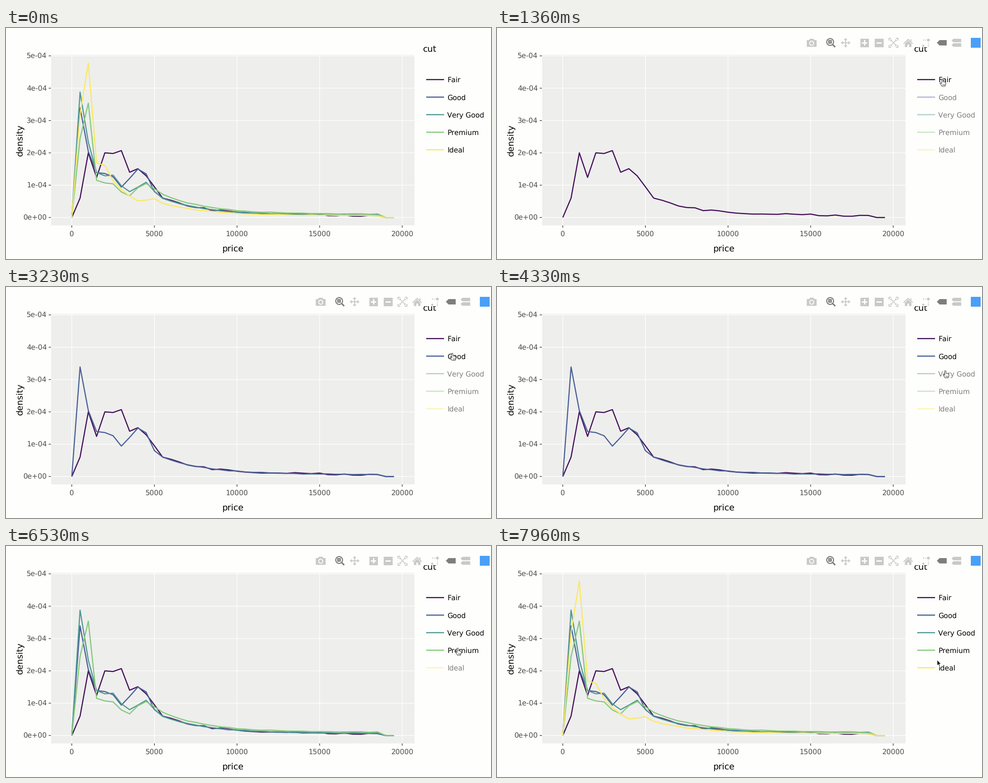
These frames come from a looping animation (1085x516 px, 8 s). A matplotlib script:

```python
import numpy as np
import matplotlib.pyplot as plt
from matplotlib.animation import FuncAnimation
from matplotlib.collections import LineCollection
from matplotlib.patches import Circle, Polygon, Rectangle
from matplotlib.transforms import Affine2D

W, H, DPI = 1085, 516, 100
LOOP, STEP = 8000, 20
PT = 72 / DPI  # points per pixel

BG, PANEL = "#fefefc", "#eeeeed"
LIGHT, DARK, BLUE = "#c9c9c9", "#7e7e7e", "#4a9ff8"

plt.rcParams.update({
    "font.family": "DejaVu Sans",
    "text.hinting": "none",
    "text.kerning_factor": 6,
    "toolbar": "None",
})

fig = plt.figure(figsize=(W / DPI, H / DPI), dpi=DPI, facecolor=BG)
ax = fig.add_axes([0, 0, 1, 1])
ax.set_xlim(0, W)
ax.set_ylim(H, 0)
ax.axis("off")


# ---------- plot scales ----------

def px(price):
    return 147.2 + price * 184.8 / 5000


def py(micro):
    """Pixel row of a density given in millionths."""
    return 423.3 - 0.722 * micro


def label(x, y, text, size=15.7, color="#4d4d4d", **kw):
    return ax.text(x, y, text, fontsize=size * PT, color=color,
                   va="baseline", **kw)


def segments(segs, color, width):
    ax.add_collection(LineCollection(segs, colors=color, zorder=1, snap=False,
                                     linewidths=width * PT))


def stroke(x, y, color):
    line, = ax.plot(x, y, color=color, lw=2.5 * PT, snap=False, zorder=3,
                    solid_joinstyle="round", solid_capstyle="butt")
    return line


# ---------- panel, grid, axes ----------

ax.add_patch(Rectangle((101, 60), 813, 381, fc=PANEL, lw=0, zorder=0))
xs = [px(5000 * i) for i in range(5)]
ys = [py(100 * i) for i in range(6)]
segments([[(x, 60), (x, 441)] for x in xs]
         + [[(101, y), (914, y)] for y in ys], "#fefefe", 1.5)
segments([[(x, 441), (x, 446)] for x in xs]
         + [[(95.5, y), (100.5, y)] for y in ys], "#444444", 1.5)

for i, x in enumerate(xs):
    label(x, 466, str(5000 * i), ha="center")
for i, y in enumerate(ys):
    label(91.6, y + 5.9, f"{i}e-04" if i else "0e+00", ha="right")

label(507.5, 499, "price", 19.4, "black", ha="center")
label(933, 53, "cut", 19.4, "black")
label(37.3, 250, "density", 19.4, "black", rotation=90,
      rotation_mode="anchor", ha="center")


# ---------- series and legend ----------

POINTS, TAIL = 40, 11
rng = np.random.default_rng(7)
series = []


def density(head, start, floor, jitter):
    """Key points for the peaks, then a noisy decay that ends at zero."""
    i = np.arange(POINTS - TAIL)
    tail = floor + (start - floor) * np.exp(-i / 5.5)
    tail += jitter * rng.uniform(-1, 1, i.size) * (i > 0)
    tail[-2:] = 0
    return np.concatenate([[0], head, tail])


def add_series(name, color, show_at, head, start, floor, jitter=1):
    line = stroke(px(500 * np.arange(POINTS)),
                  py(density(head, start, floor, jitter)), color)
    y = 115.2 + 39.2 * len(series)
    key = stroke([940, 980], [y, y], color)
    text = label(987, y + 6, name, color="black")
    series.append((show_at, y, line, key, text))


add_series("Fair", "#440e58", 0,
           [60, 200, 124, 200, 198, 207, 140, 151, 129, 95], 60, 6, 3)
add_series("Good", "#486097", 3230,
           [339, 204, 139, 136, 126, 94, 121, 150, 135, 80], 60, 6)
add_series("Very Good", "#4f9794", 5000,
           [388, 233, 139, 129, 131, 98, 80, 94, 109, 81], 59, 7)
add_series("Premium", "#84c97b", 6530,
           [244, 354, 115, 107, 104, 79, 67, 92, 105, 89], 72, 10)
add_series("Ideal", "#fae962", 7830,
           [320, 478, 169, 161, 114, 87, 66, 51, 54, 58], 44, 5.5)

ISOLATE = 1260


# ---------- toolbar ----------

bar = []


def put(patch):
    patch.set_zorder(5)
    bar.append(ax.add_patch(patch))


def box(x, y, w, h, color=LIGHT):
    put(Rectangle((x, y), w, h, fc=color, lw=0))


def poly(points, color=LIGHT):
    put(Polygon(points, closed=True, fc=color, lw=0))


def disc(x, y, r, color=LIGHT):
    put(Circle((x, y), r, fc=color, lw=0))


def tag(x, y, w, h, color=LIGHT):
    """Label shape pointing left, centred on row y."""
    tip = h / 2
    poly([(x, y), (x + tip, y - tip), (x + w, y - tip),
          (x + w, y + tip), (x + tip, y + tip)], color)


def camera(x, y):
    box(x - 11, y - 6.5, 22, 15.5)
    poly([(x - 6, y - 6), (x - 4, y - 9), (x + 4, y - 9), (x + 6, y - 6)])
    disc(x, y + 1, 5.6, BG)
    disc(x, y + 1, 3.6)


def magnifier(x, y):
    poly([(x + 4, y + 6), (x + 6, y + 4), (x + 12.5, y + 10),
          (x + 10, y + 12.5)], DARK)
    disc(x, y, 8.8, DARK)
    disc(x, y, 6.4, BG)
    box(x - 4, y - 4, 8, 8, DARK)
    box(x - 2, y - 2, 4, 4, "#a9a9a9")


def cross_arrows(x, y):
    box(x - 1.2, y - 7, 2.4, 14)
    box(x - 7, y - 1.2, 14, 2.4)
    for dx, dy in [(1, 0), (-1, 0), (0, 1), (0, -1)]:
        cx, cy = x + 6 * dx, y + 6 * dy
        poly([(cx + 4.8 * dx, cy + 4.8 * dy),
              (cx + 4 * dy, cy + 4 * dx), (cx - 4 * dy, cy - 4 * dx)])


def square_sign(x, y, plus):
    box(x - 9.7, y - 9.5, 19.5, 19)
    box(x - 6, y - 1.5, 12, 3, BG)
    if plus:
        box(x - 1.5, y - 6, 3, 12, BG)


def expand(x, y):
    bracket = np.array([(10.8, 10.8), (10.8, 5), (9.2, 5),
                        (9.2, 9.2), (5, 9.2), (5, 10.8)])
    spoke = np.array([(7.2, 7.2), (7.2, 3), (5.7, 4.5), (1, -0.2),
                      (-0.2, 1), (4.5, 5.7), (3, 7.2)])
    for flip in [(1, 1), (1, -1), (-1, 1), (-1, -1)]:
        for shape in (bracket, spoke):
            poly(shape * flip + (x, y))


def house(x, y):
    poly([(x - 11, y + 1.5), (x, y - 9), (x + 11, y + 1.5),
          (x + 9.4, y + 2.8), (x, y - 6), (x - 9.4, y + 2.8)])
    poly([(x - 7.3, y + 2.3), (x, y - 4.7), (x + 7.3, y + 2.3),
          (x + 7.3, y + 9.5), (x - 7.3, y + 9.5)])
    box(x + 5, y - 8.2, 2.6, 5)
    box(x - 2, y + 3.8, 4, 5.8, BG)


def spikes(x, y):
    disc(x, y, 3.2)
    for d in (9.9, 5, ):
        box(x - d - 2.4, y - 1.4, 2.8, 2.8)
    for d in (5.5, 9.5, 13):
        box(x - 1.4, y + d, 2.8, 2.2)
    disc(x - 11.5, y + 12.5, 2.4)


box(688, 12, 397, 30.5, BG)
camera(704, 33)
magnifier(745.3, 31.3)
cross_arrows(779.9, 33)
square_sign(822.2, 33, True)
square_sign(854.8, 33, False)
expand(887, 33)
house(919.8, 33)
spikes(965, 27)
tag(984, 33, 22, 12, DARK)
for row in (28, 38):
    tag(1017, row, 21.5, 7.8)
box(1060, 22, 21.5, 22, BLUE)


# ---------- cursor ----------

shift = Affine2D()
cursor_space = shift + ax.transData
HAND = [(-1.6, 1), (-0.8, 0), (0.6, 0), (1.4, 1), (1.6, 6), (4.2, 6),
        (6.4, 7), (8.2, 8.8), (7.8, 12), (6.4, 16), (-0.6, 16),
        (-5, 9.4), (-4.4, 8.2), (-3, 8.6), (-1.3, 10.2)]
ARROW = [(0, 0), (0, 13.6), (3, 10.8), (5.1, 15.8), (7.3, 14.8),
         (5.2, 9.9), (9.3, 9.7)]


def pointer(points, fill, edge):
    return ax.add_patch(Polygon(points, fc=fill, ec=edge, lw=1.1 * PT,
                                joinstyle="round", zorder=8,
                                transform=cursor_space))


hand = pointer(HAND, "#f6f6f6", "#444444")
arrow = pointer(ARROW, "#1c1c1c", "white")
creases = LineCollection([[(x, 10.5), (x, 13.8)] for x in (1.2, 3.3, 5.4)],
                         colors="#555555", linewidths=0.9 * PT,
                         transform=cursor_space, zorder=9)
ax.add_collection(creases, autolim=False)

ENTER = 430
START = (1070, 146)
MOVES = [  # begin, end, destination
    (430, 1000, (996, 114)),
    (2230, 2460, (998.5, 148)),
    (4130, 4330, (1003, 187)),
    (5460, 6000, (1010.5, 228)),
    (6960, 7460, (1010.5, 264)),
    (7830, 7960, (984.5, 254)),
]


def cursor_at(t):
    pos = np.array(START, float)
    for begin, end, goal in MOVES:
        p = np.clip((t - begin) / (end - begin), 0, 1)
        pos += (1 - (1 - p) ** 2) * (np.array(goal) - pos)
    return pos


def update(frame):
    t = frame * STEP + STEP / 2

    fade = float(np.clip((t - ENTER) / 300, 0, 1))
    for patch in bar:
        patch.set_alpha(fade)
        patch.set_visible(fade > 0)

    for show_at, _, line, key, text in series:
        on = t < ISOLATE or t >= show_at
        line.set_visible(on)
        key.set_alpha(1 if on else 0.45)
        text.set_alpha(1 if on else 0.5)

    x, y = cursor_at(t)
    shift.clear().translate(x, y)
    over = any(abs(y - row) < 10.5 for _, row, *_ in series)
    shown = t >= ENTER
    hand.set_visible(shown and over)
    creases.set_visible(shown and over)
    arrow.set_visible(shown and not over)
    return []


anim = FuncAnimation(fig, update, frames=LOOP // STEP, interval=STEP,
                     repeat=True, repeat_delay=0, blit=False)
plt.show()
```
